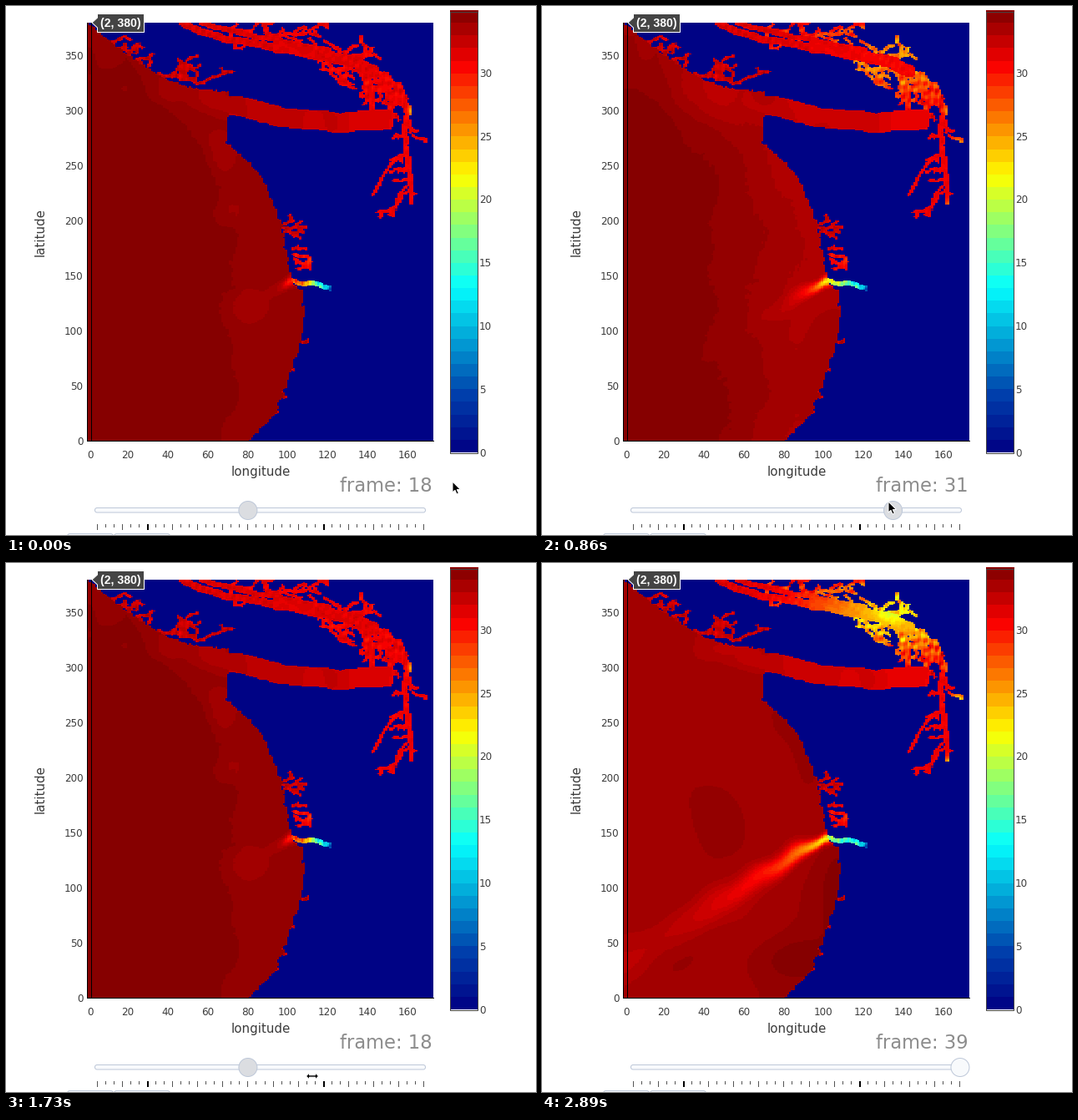
These frames come from a looping animation (635 by 634 pixels, 3240 ms). A matplotlib script:

```python
import numpy as np
import matplotlib.pyplot as plt
from matplotlib.animation import FuncAnimation
from matplotlib.patches import Circle, FancyBboxPatch, Polygon, Rectangle

W, H, DPI = 635, 634, 100
LOOP, TICK, HOLD = 3240, 20, 60
LEFT, RIGHT, TOP, BOTTOM = 97, 512, 20, 521
COLS, ROWS = 173, 380
CELL_W, CELL_H = (RIGHT - LEFT) / COLS, (BOTTOM - TOP) / ROWS
GREY, RAIL, PALE = "#3c3c3c", "#bec8d9", "#f8fafc"

rng = np.random.default_rng(11)
X, Y = np.meshgrid(LEFT + (np.arange(COLS) + .5) * CELL_W,
                   TOP + (np.arange(ROWS) + .5) * CELL_H)


def px(size):
    return size * 72 / DPI


def jet(v, step):
    """Banded colour of a value between 0 and 35."""
    s = (np.floor(np.clip(v, 0, 34.99) / step) + .5) * step / 35
    stops = [0, .125, .375, .625, .875, 1]
    chans = ([0, 0, 5, 255, 250, 128], [0, 60, 255, 255, 0, 0],
             [131, 170, 255, 0, 0, 0])
    return np.stack([np.interp(s, stops, c) for c in chans], -1) / 255


def noise(scale, stretch=1):
    total = np.zeros_like(X)
    for _ in range(9):
        a, f = rng.uniform(0, 2 * np.pi), rng.uniform(.6, 1.8) * 2 * np.pi / scale
        total += np.sin(f * (X * np.cos(a) + Y * np.sin(a) / stretch)
                        + rng.uniform(0, 6.3))
    return total / 2.2


def soft(d, w):
    return .5 + .5 * np.tanh(d / w)


def blob(cx, cy, rx, ry):
    return np.exp(-((X - cx) / rx) ** 2 - ((Y - cy) / ry) ** 2)


wide, mid, fine = noise(130, 1.8), noise(50, 2), noise(12)


# ---- shapes of the water ----

def stamp(mask, p, width):
    """Mark the cells under a line of the given width."""
    k = np.arange(len(p))
    t = np.linspace(0, len(p) - 1, int(np.hypot(*np.diff(p, axis=0).T).sum()) + 2)
    x, y = np.interp(t, k, p[:, 0]), np.interp(t, k, p[:, 1])
    steps = np.linspace(-.5, .5, int(width) + 1) * width
    for dx in steps:
        for dy in steps:
            if np.hypot(dx, dy) > width * .56:
                continue
            i = np.floor((x + dx - LEFT) / CELL_W).astype(int)
            j = np.floor((y + dy - TOP) / CELL_H).astype(int)
            ok = (i >= 0) & (i < COLS) & (j >= 0) & (j < ROWS)
            mask[j[ok], i[ok]] = True


def trunk(width, pts, amp=1.5):
    """Broad channel, roughened by midpoint displacement."""
    mask = np.zeros(X.shape, bool)
    p = np.array(pts, float).reshape(-1, 2)
    for _ in range(3):
        q = np.empty((2 * len(p) - 1, 2))
        q[::2] = p
        q[1::2] = (p[1:] + p[:-1]) / 2 + rng.normal(0, amp, (len(p) - 1, 2))
        p, amp = q, amp / 2
    stamp(mask, p, width)
    return mask


def creep(mask, start, heading, length):
    """Thin wandering creek that forks now and then."""
    p, ang = [np.array(start, float)], heading
    for _ in range(int(length / 4)):
        ang += rng.normal(0, .55) + .35 * (heading - ang)
        p.append(p[-1] + 4 * np.array([np.cos(ang), .9 * np.sin(ang)]))
        if length > 10 and rng.random() < .2:
            creep(mask, p[-1], heading + rng.choice([-.9, .9]), length * .4)
    stamp(mask, np.array(p), 2)


def spray(count, ax_, ay, bx, by, heading, length):
    """Creeks that leave a line from a to b at even spacing."""
    mask = np.zeros(X.shape, bool)
    for f in (np.arange(count) + .5) / count:
        start = ax_ + f * (bx - ax_), ay + f * (by - ay)
        creep(mask, start, heading + rng.normal(0, .12), length * rng.uniform(.7, 1.2))
    return mask


def union(make, rows):
    return np.any([make(*row) for row in rows], axis=0)


shore = TOP + 82 * np.sin(np.pi / 2 * np.clip((X - 98) / 156, 0, 1))
coast = np.interp(Y, [124, 163, 180, 205, 260, 328, 345, 385, 440, 490, 521],
                  [267, 264, 283, 307, 330, 342, 357, 357, 342, 322, 292])
open_sea = (X < coast + fine) & (Y > shore + .8 * fine)
arm = union(trunk, [(21, [240, 111, 300, 125, 350, 136, 400, 141, 442, 138]),
                    (22, [425, 138, 453, 136])])
ocean = open_sea | arm

trunks = union(trunk, [
    (7, [212, 20, 262, 40, 310, 47, 345, 52]),
    (5, [235, 20, 300, 37, 385, 52]),
    (12, [325, 48, 400, 64, 440, 78])])
links = union(trunk, [
    (6, [440, 78, 470, 95, 480, 125]),
    (5, [430, 75, 440, 102, 437, 130]),
    (4, [452, 86, 462, 110, 460, 135])])
twigs = links | union(spray, [
    (8, 250, 25, 390, 42, .12, 42),
    (8, 370, 66, 436, 84, .45, 42),
    (3, 400, 54, 430, 62, -.6, 26),
    (7, 425, 80, 472, 98, 1.5, 40)])
south = union(trunk, [
    (4, [482, 120, 477, 150, 483, 190, 486, 235]),
    (2, [478, 178, 458, 195, 440, 226]),
    (2, [486, 210, 466, 242, 445, 247])]) | union(spray, [
        (6, 478, 150, 486, 225, 2.2, 24),
        (3, 480, 130, 488, 160, .6, 16),
        (3, 468, 240, 448, 248, 1.3, 14)])
creeks = union(spray, [
    (4, 120, 40, 160, 68, .3, 26),
    (4, 178, 80, 212, 88, -.3, 46),
    (3, 332, 259, 334, 273, 0, 30),
    (5, 342, 288, 350, 318, 0, 22),
    (4, 353, 390, 312, 502, 0, 13)])
spout = ((X > 340) & (X < 390)
         & (abs(Y - 329 - .16 * (X - 340) - 1.5 * np.sin(X / 5)) < 3.2))


# ---- temperature fields ----

rim = 100 + 165 * np.sin(np.pi / 2 * np.clip((Y - TOP) / 240, 0, 1))
inshore = X - rim + 5 * wide + 4 * mid + 1.5 * fine
tip = blob(488, 126, 5, 7)
far_tips = blob(498, 165, 8, 8) + blob(491, 238, 8, 5)


def plume(peak, reach, haze=0):
    """Warm tongue spreading south-west from the river mouth."""
    d = np.maximum(338 - X, 0)
    across = (Y - 329 - .62 * d + 2 * mid) / (6.5 + .11 * d)
    return (peak * np.exp(-d / reach) + haze) * np.exp(-across ** 2)


def field(sea, chill, core, tips, far, jet_start):
    """Put the water bodies together; chill cools the delta, core its trunk."""
    near_arm = np.maximum(soft(128 + .18 * (X - 260) - Y, 8), arm & ~open_sea)
    arm_v = np.interp(X, [160, 225, 300, 400, 460], [34.5, 33.5, 33, 32.2, 31.4])
    arm_v = arm_v - .06 * chill + .15 * mid
    v = np.where(ocean, sea + (np.minimum(sea, arm_v) - sea) * near_arm, 0)
    cool = blob(425, 62, 105, 45)
    spout_v = np.interp(X, [342, 360, 374, 390], [jet_start, jet_start - 4, 14, 8])
    layers = [
        (creeks, 32.3 - 2.3 * blob(360, 303, 18, 20) + .5 * fine),
        (south, 31 + .3 * fine - far * far_tips - tips * tip),
        (twigs, 31.3 + (.4 + .12 * chill) * fine - chill * cool - tips * tip),
        (trunks, 31.7 + .35 * fine - core * cool),
        (spout, spout_v + 1.8 * fine)]
    for mask, val in layers:
        v = np.where(mask & ~ocean, val, v)
    return v


patches = blob(272, 245, 20, 15) + blob(293, 443, 12, 7)
bays = blob(255, 175, 22, 28) + blob(264, 250, 20, 18) + blob(288, 360, 28, 22)
sea9 = 34.8 - .6 * soft(inshore, 3) - .45 * patches - plume(2, 6)
sea18 = 34.8 - .6 * soft(inshore, 10) - .5 * bays - plume(4.5, 7)
sea31 = (34.75 - .45 * soft(inshore + 55, 14) - .5 * soft(inshore + 12, 14)
         - .45 * soft(inshore - 25, 20) - .7 * blob(200, 105, 45, 32)
         + .7 * blob(350, 450, 35, 70) - plume(11, 17, .2))
sea39 = (33.85 + .12 * wide + .9 * blob(300, 475, 60, 30) + .9 * blob(354, 400, 20, 60)
         + .5 * blob(318, 235, 14, 50) - 1.2 * blob(220, 102, 45, 18)
         - plume(11, 55, .9))

KEYS = {9: field(sea9, 0, 0, 10, 0, 31), 18: field(sea18, .5, .2, 10, 0, 29),
        31: field(sea31, 5.5, 1, 9, 6, 22),
        39: field(sea39 - 0, 8.5, 8, 7, 10, 19) - 4 * trunks * blob(420, 57, 16, 12)}


def heat(n):
    nums = list(KEYS)
    n = max(n, nums[0])
    k = min(np.searchsorted(nums, n, side="right") - 1, len(nums) - 2)
    a, b = nums[k:k + 2]
    f = (n - a) / (b - a)
    return jet(KEYS[a] * (1 - f) + KEYS[b] * f, .5)


IMAGES = [heat(n) for n in range(40)]


# ---- fixed parts ----

fig = plt.figure(figsize=(W / DPI, H / DPI), dpi=DPI, facecolor="white")
ax = fig.add_axes([0, 0, 1, 1])
image = ax.imshow(IMAGES[18], extent=(LEFT, RIGHT, BOTTOM, TOP),
                  aspect="auto", interpolation="nearest", zorder=1)


def label(x, y, text, size=12, color=GREY, ha="center", **kw):
    kw.setdefault("va", "center")
    kw.setdefault("family", "DejaVu Sans")
    return ax.text(x, y, text, fontsize=px(size), color=color, ha=ha, **kw)


def fill(x, y, w, h, color="black"):
    ax.add_patch(Rectangle((x, y), w, h, fc=color, ec="none", lw=0, zorder=3))


def pill(x, y, w, h, r):
    ax.add_patch(FancyBboxPatch((x + r, y + r), w - 2 * r, h - 2 * r,
                                boxstyle=f"round,pad={r}", fc=PALE, ec=RAIL,
                                lw=px(1), zorder=3))


for lon in range(0, 161, 20):
    label(97.8 + 2.395 * lon if lon else 101, 539, str(lon))
for lat in range(0, 351, 50):
    label(92.5, 522 - 1.3185 * lat, str(lat), ha="right")
label(305, 559, "longitude", 15)
label(41, 271, "latitude", 15, rotation=90)

fill(97, 20, 1, 502)
fill(102, 20, 1.3, 502)
fill(97, 521, 416, 1)

bar = jet(np.arange(34.5, 0, -1), 1)[:, None]
ax.imshow(bar, extent=(531.5, 565, 535.5, 6), aspect="auto", interpolation="nearest")
ax.add_patch(Rectangle((531.5, 6.5), 33, 529, fill=False, ec="#444444", lw=px(1)))
for v in range(0, 31, 5):
    label(567, 536 - 15.15 * v, str(v), ha="left")

ax.add_patch(Polygon([(103, 20), (109.5, 14), (109.5, 9.5), (165.5, 9.5), (165.5, 31.5),
                      (109.5, 31.5), (109.5, 26)], fc="#444444", ec="white",
                     lw=px(1), zorder=5))
label(137.5, 20.5, "(2, 380)", 14, "white", family="Liberation Sans",
      weight="bold", zorder=6)

pill(106.5, 601.5, 396, 5.5, 2.6)
pill(73.5, 632.5, 55, 20, 3)
pill(129.5, 632.5, 67, 20, 3)
for k in range(40):
    dark = k % 21 == 6
    fill(108.5 + 10.05 * k, 621, 1.7 if dark else 1, 7 if k % 3 == 0 else 4,
         "black" if dark else "#555555")

# ---- moving parts ----

title = label(400.5, 582.5, "", 22.6, "#8c8c8c", ha="left", va="baseline")
knob = Circle((0, 604.5), 11, ec=RAIL, lw=px(1), zorder=7)
ax.add_patch(knob)

ARROW = np.array([(0, 0), (0, 13), (3, 10.3), (5, 15), (7.3, 14), (5.3, 9.5), (9.5, 9.5)])
half = np.array([(-7.5, 0), (-3.5, -4), (-3.5, -1.2), (0, -1.2)])
SIDEWAYS = np.vstack([half, half[::-1] * (-1, 1), half * (-1, -1), half[::-1] * (1, -1)])
cursor = Polygon(ARROW, fc="black", ec="white", lw=px(1), zorder=9)
ax.add_patch(cursor)

# time, slider step, pointer x and y
CUES = np.array([
    (0, 18, 535, 570), (240, 9, 240, 600), (470, 10, 215, 612), (860, 31, 415, 594),
    (1030, 31, 400, 600), (1210, 9, 150, 604), (1330, 4, 130, 608), (1590, 6, 215, 610),
    (1730, 18, 367, 615), (2110, 36, 517, 622), (2290, 39, 541, 625),
    (2650, 39, 541, 625), (2890, 39, 545, 634)])
TIMES = CUES[:, 0]


def draw(i):
    now = i * TICK + TICK / 2
    cue = TIMES[TIMES <= now][-1]
    t = cue + (now - cue) // HOLD * HOLD
    step, x, y = (np.interp(t, TIMES, col) for col in CUES[:, 1:].T)
    n = int(round(step))
    image.set_data(IMAGES[n])
    title.set_text(f"frame: {n}")
    knob.center = (109 + 10.05 * n, 604.5)
    knob.set_facecolor(PALE if t >= 2650 else "#dbdde1")
    drag = 470 <= t < 860 or 1030 <= t < 2110
    cursor.set_xy((SIDEWAYS if drag else ARROW) + (x, y))
    cursor.set_visible(not 180 <= t < 470 and t < 2890)
    return image, title, knob, cursor


ax.set_xlim(0, W)
ax.set_ylim(H, 0)
ax.axis("off")

anim = FuncAnimation(fig, draw, frames=LOOP // TICK, interval=TICK,
                     repeat=True, repeat_delay=0, blit=False)
plt.show()
```
